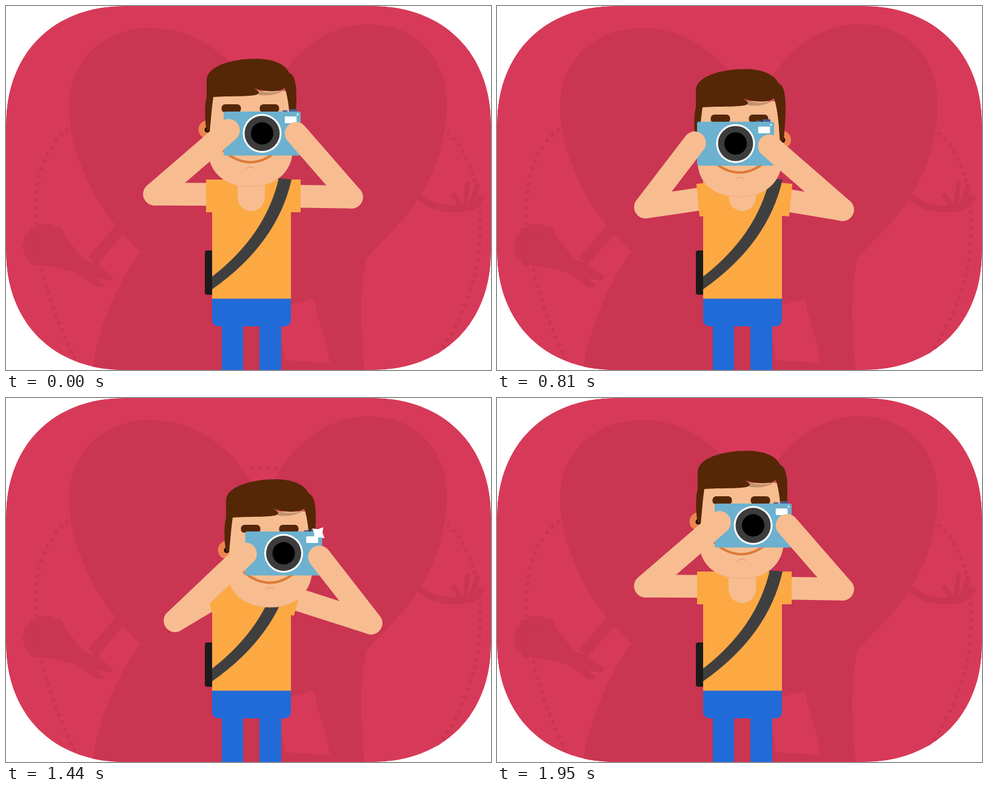
An HTML page with a canvas that plays this animation: 800 px wide and 600 px high, repeating every 2.1 s.

```html
<!DOCTYPE html>
<html lang="en">
<head>
<meta charset="utf-8">
<title>Photographer</title>
<style>
html, body { margin: 0; width: 100%; height: 100%; overflow: hidden; background: #fff; }
canvas { display: block; width: 800px; height: 600px; }
</style>
</head>
<body>
<canvas id="stage" width="800" height="600"></canvas>
<script>
const ctx = document.getElementById('stage').getContext('2d');
const LOOP = 2100, STEP = 30;
const RED = '#d73a58', SHADE = '#ca3552', SKIN = '#f7bd91', SHIRT = '#fca944',
      HAIR = '#552706', BLUE = '#216bd8', EAR = '#ee8550';

// Pose: head, camera, left hand, right hand, left elbow, right elbow, shoulder drop
const POSES = [
  [0, 0, 422.5, 210, 367, 205, 478.5, 210, 245, 310, 570, 315, 0],
  [-4.7, 0, 393.5, 210, 326, 205, 449.5, 210, 245, 310, 570, 315, 0],
  [0, 47, 393.5, 256, 326, 262, 448.5, 267, 245, 369, 570, 372, 1],
  [32, 47, 458, 256, 395, 257, 517, 262, 279, 367, 602, 371, 1]
];
const MOVES = [[150, 480], [690, 985], [1140, 1440], [1600, 1815]];
const FLASHES = [525, 1402], FLASH_TIME = 150;

const path = d => new Path2D(d);
const art = {
  card: path('M195 0H605C722 0 800 78 800 195V405C800 522 722 600 605 600H195C78 600 0 522 0 405V195C0 78 78 0 195 0Z'),
  couple: path('M240 36C300 36 360 70 400 130L423 165L446 130C478 70 535 30 598 30C680 30 727 90 727 160' +
    'C727 235 700 305 640 368L595 415C583 460 585 540 592 600H142C150 540 180 460 222 405' +
    'C165 355 104 260 104 165C104 90 160 36 240 36Z'),
  gap: path('M508 482L470 493L448 512L460 584L534 588C528 550 514 520 508 482Z'),
  rightArm: path('M684 316C708 336 746 340 776 327'),
  fingers: path('M748 326L738 312M758 324L761 294M768 324L777 297M774 326L785 316'),
  leftArm: path('M190 366L143 420'),
  bouquet: path('M40 425L92 372L128 418L148 424L178 446L172 453L150 448L165 462L150 464L118 440L90 433Z'),
  dots: path('M103 202C60 235 40 300 51 380C58 450 82 520 114 582' +
    'M727 208C775 250 790 330 778 420C765 490 738 540 708 582M402 117H448'),
  strap: path('M450 284L471 286Q447 392 340 467V446Q428 378 450 284Z'),
  neck: path('M382 280H427V315A22.5 23 0 0 1 382 315Z'),
  face: path('M341 140H465L473 235C473 275 443 298 403 298C363 298 334 275 334 240Z'),
  chin: path('M380 295Q403 300 427 295'),
  smile: path('M359 239Q403 276 447 239'),
  dimple: path('M396 268Q403 263 410 268'),
  lockShade: path('M406 134C425 145 450 145 461 135C455 145 435 149 418 147Z'),
  hair: path('M331 150V122C331 100 370 87 412 87C440 87 460 95 467 110C476 114 479 128 479 150' +
    'C479 175 477 190 476 205L470 207C468 190 468 160 460 135C450 143 425 142 406 134' +
    'C417 139 420 144 414 146C400 150 370 148 342 150C339 170 338 190 336 205L331 207C328 190 327 165 331 150Z')
};

function fill(color, p) {
  ctx.fillStyle = color;
  ctx.fill(p);
}

function stroke(color, width, p, cap = 'round') {
  ctx.strokeStyle = color;
  ctx.lineWidth = width;
  ctx.lineCap = cap;
  ctx.stroke(p);
}

function disc(color, x, y, r) {
  const p = new Path2D();
  p.arc(x, y, r, 0, Math.PI * 2);
  fill(color, p);
}

function box(color, x, y, w, h, r = 0) {
  const p = new Path2D();
  p.roundRect(x, y, w, h, r);
  fill(color, p);
}

function limb(x1, y1, x2, y2) {
  stroke(SKIN, 37.5, path(`M${x1} ${y1}L${x2} ${y2}`));
}

function poseAt(t) {
  let i = -1;
  while (i < 3 && t >= MOVES[i + 1][0]) i++;
  if (i < 0) return POSES[0];
  const [start, end] = MOVES[i];
  const p = Math.min(1, (t - start) / (end - start));
  const k = p * p * (3 - 2 * p);
  const next = POSES[(i + 1) % 4];
  return POSES[i].map((v, j) => v + (next[j] - v) * k);
}

function background() {
  fill('#fff', path('M0 0H800V600H0Z'));
  ctx.save();
  ctx.clip(art.card);
  fill(RED, art.card);
  fill(SHADE, art.couple);
  fill(RED, art.gap);
  stroke(SHADE, 12, art.rightArm);
  stroke(SHADE, 8, art.fingers);
  stroke(SHADE, 19, art.leftArm, 'butt');
  fill(SHADE, art.bouquet);
  disc(SHADE, 67, 396, 31);
  for (let a = 2.2; a < 5.6; a += 0.45) disc(SHADE, 67 + 30 * Math.cos(a), 396 + 28 * Math.sin(a), 10);
  ctx.setLineDash([6, 7]);
  stroke(SHADE, 6, art.dots, 'butt');
  ctx.setLineDash([]);
  ctx.restore();
}

function sleeve(x, y, angle, side) {
  ctx.save();
  ctx.translate(x, y);
  ctx.rotate(angle);
  box(SHIRT, side < 0 ? 0 : -36, -27, 36, 54);
  ctx.restore();
}

function body(elx, ely, erx, ery, drop) {
  box('#1c1b1b', 328, 403, 22, 73, 4);
  box(BLUE, 356, 515, 35, 85);
  box(BLUE, 418, 515, 36, 85);
  box(BLUE, 340, 475, 130, 53, [0, 0, 10, 10]);
  limb(elx, ely, 345, 310.5 + 17 * drop);
  limb(erx, ery, 474, 313.5 + 16.5 * drop);
  const tilt = 0.27 * drop;
  sleeve(330 + 4 * drop, 313 + 20 * drop, -tilt, -1);
  sleeve(486 - 4 * drop, 313 + 20 * drop, tilt, 1);
  box(SHIRT, 340, 286, 130, 196.5);
  fill(SKIN, art.neck);
  fill('#403f3f', art.strap);
}

function head(x, y) {
  ctx.save();
  ctx.translate(x, y);
  for (const [ear, hole] of [[332.5, 332], [473, 474]]) {
    disc(EAR, ear, 203.5, 15);
    disc('#160b06', hole, 204, 4.5);
  }
  fill(SKIN, art.face);
  stroke('#f4b284', 1.5, art.chin);
  fill('#c4926f', art.lockShade);
  fill(HAIR, art.hair);
  box(HAIR, 355.5, 162, 32, 13, [6, 6, 5, 5]);
  box(HAIR, 418.5, 162, 32, 13, [6, 6, 5, 5]);
  stroke('#dd7a35', 4, art.smile);
  stroke('#e3a174', 1.5, art.dimple);
  ctx.restore();
}

function star(r) {
  ctx.save();
  ctx.translate(57.3, -33);
  ctx.rotate(-0.12);
  const p = new Path2D();
  for (let i = 0; i <= 8; i++) {
    const a = (i + 1) * Math.PI / 4, d = i % 2 ? r * 0.53 : r;
    p.lineTo(d * Math.cos(a), d * Math.sin(a));
  }
  fill('#fff', p);
  ctx.restore();
}

function camera(x, y, t) {
  ctx.save();
  ctx.translate(x, y);
  box('#4a5a8f', 45, -40, 12.5, 6, 1);
  box('#4a5a8f', 33.5, -38, 8, 4, 1);
  box('#6cb1cf', -63.5, -36, 127, 72.5, 3);
  disc('#fff', 0, 0, 32);
  disc('#3d3c3c', 0, 0, 29);
  disc('#000', 0, 0, 18.5);
  box('#fff', 37.3, -28, 19.5, 11, 1);
  disc('#fff', 58.5, -31, 1.5);
  for (const start of FLASHES) {
    const p = (t - start) / FLASH_TIME;
    if (p > 0 && p < 1) star(18 * Math.sin(p * Math.PI));
  }
  ctx.restore();
}

function draw(t) {
  const [hx, hy, cx, cy, lx, ly, rx, ry, elx, ely, erx, ery, drop] = poseAt(t);
  background();
  body(elx, ely, erx, ery, drop);
  head(hx, hy);
  camera(cx, cy, t);
  limb(elx, ely, lx, ly);
  limb(erx, ery, rx, ry);
}

const began = performance.now();
function tick() {
  const t = (performance.now() - began) % LOOP;
  draw(Math.floor(t / STEP) * STEP);
  requestAnimationFrame(tick);
}
tick();
</script>
</body>
</html>
```
